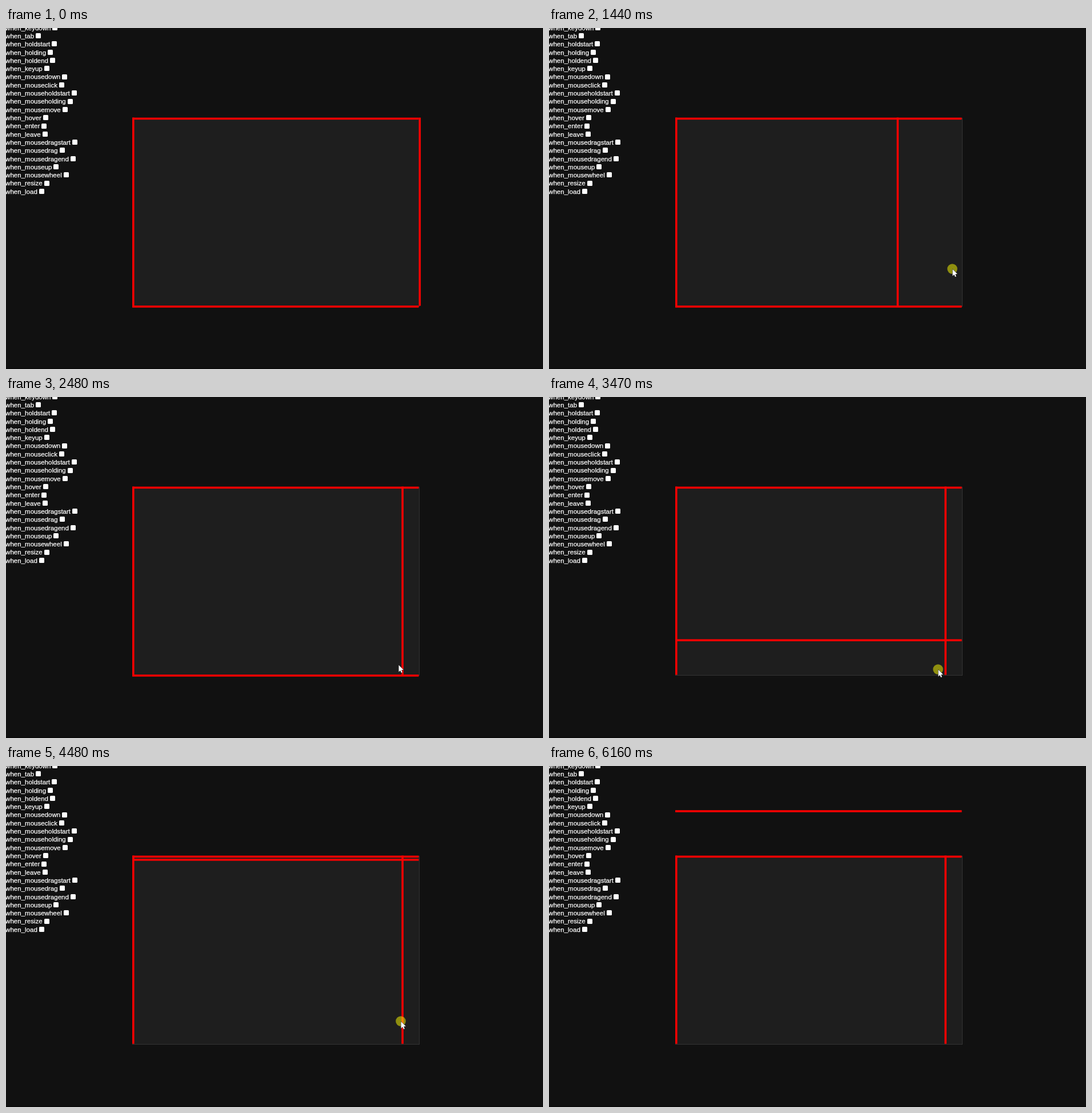
An HTML page with a canvas that plays this animation: 940x596 px, repeating every 6.39 s.

```html
<!DOCTYPE html>
<html lang="en">
<head>
<meta charset="utf-8">
<title>Panel edge dragging</title>
<style>
  html, body { margin: 0; width: 100%; height: 100%; overflow: hidden; background: #111; }
  canvas { display: block; width: 940px; height: 596px; }
</style>
</head>
<body>
<canvas id="stage" width="940" height="596"></canvas>
<script>
const ctx = document.getElementById('stage').getContext('2d', { alpha: false });
const LOOP = 6390;
const LINE = 3.6;
const PANEL = { left: 221, top: 157, right: 724, bottom: 487 };

const EVENTS = ['keydown', 'tab', 'holdstart', 'holding', 'holdend', 'keyup',
  'mousedown', 'mouseclick', 'mouseholdstart', 'mouseholding', 'mousemove',
  'hover', 'enter', 'leave', 'mousedragstart', 'mousedrag', 'mousedragend',
  'mouseup', 'mousewheel', 'resize', 'load'];

const progress = (t, start, end) => Math.min(1, Math.max(0, (t - start) / (end - start)));
const mix = (a, b, u) => a + (b - a) * u;
const easeOut = (u, power) => 1 - (1 - u) ** power;

// Sways through the stops in turn, resting for an instant at each
function swing(u, stops) {
  const phase = u * (stops.length - 1);
  const i = Math.min(Math.floor(phase), stops.length - 2);
  return mix(stops[i], stops[i + 1], (1 - Math.cos((phase - i) * Math.PI)) / 2);
}

// The side edge sways faster and faster
function sideEdge(t) {
  return swing(progress(t, 860, 2100) ** 1.317, [724.3, 905, 263, 884, 694.1]);
}

const lowerDrag = t => progress(t, 3120, 5150);

function lowerEdge(t) {
  const lift = swing(progress(t, 5380, 5500), [0, 86]);
  return swing(lowerDrag(t), [486.9, 408, 690, 7, 165]) - lift;
}

function pointerAt(t) {
  if (t < 860) {
    const u = easeOut(progress(t, 90, 530), 2);
    return [mix(875, 726, u), mix(588, 420, u)];
  }
  if (t < 2260) {
    // The side edge's speed follows how far the pointer has been pulled
    const speed = (sideEdge(t + 1) - sideEdge(t - 1)) / 2;
    const u = progress(t, 860, 2100);
    return [mix(726, 722, u) + 5.4 * speed, mix(420, 427, u ** 3)];
  }
  if (t < 3120) {
    const u = progress(t, 2260, 2890);
    return [mix(722, 682, easeOut(u, 5)), mix(427, 484, easeOut(u, 3))];
  }
  if (t < 5720) {
    const u = lowerDrag(t);
    const nudge = progress(t, 5380, 5690);
    return [swing(u, [682, 681, 682, 694, 697]) + 4 * nudge,
      swing(u, [484, 474, 489, 433, 450]) - nudge];
  }
  const u = progress(t, 5720, 6160) ** 1.6;
  return [mix(701, 875, u), mix(449, 600, u)];
}

function box(color, x, y, w, h) {
  ctx.fillStyle = color;
  ctx.fillRect(x, y, w, h);
}

function drawList() {
  ctx.font = '11.52px "Liberation Sans", Arial, sans-serif';
  ctx.textBaseline = 'alphabetic';
  ctx.fillStyle = ctx.strokeStyle = '#fff';
  ctx.lineWidth = 0.25;
  EVENTS.forEach((name, i) => {
    const label = 'when_' + name;
    const y = 3.6 + i * 14.31;
    ctx.fillText(label, -0.9, y);
    ctx.strokeText(label, -0.9, y);
    const x = Math.round(ctx.measureText(label).width + 2.1);
    ctx.beginPath();
    ctx.roundRect(x, Math.round(y - 8.8), 9, 9, 1.5);
    ctx.fill();
  });
}

function drawPanel(edgeX, edgeY) {
  const { left, top, right, bottom } = PANEL;
  const red = '#f80000';
  const vertical = x => box(red, x - LINE / 2, top - 0.4, LINE, bottom - top - 1);
  const horizontal = y => box(red, left, y - LINE / 2, 501.5, LINE);
  box('#333', left, top, right - left, bottom - top);
  box('#1e1e1e', left + 1, top + 1, right - left - 2, bottom - top - 2);
  horizontal(158.4);
  vertical(left + LINE / 2);
  vertical(edgeX);
  horizontal(edgeY);
}

function drawPointer(x, y, pressed) {
  if (pressed) {
    ctx.fillStyle = 'rgba(255,255,0,0.5)';
    ctx.beginPath();
    ctx.arc(x, y, 8.8, 0, Math.PI * 2);
    ctx.fill();
  }
  ctx.save();
  ctx.translate(x + 0.5, y + 0.5);
  ctx.beginPath();
  [[0, 0], [0, 12], [2.7, 9.5], [4.5, 13.6], [6.4, 12.8], [4.7, 8.8], [8.4, 8.6]]
    .forEach(p => ctx.lineTo(...p));
  ctx.closePath();
  ctx.strokeStyle = '#111';
  ctx.lineWidth = 1;
  ctx.stroke();
  ctx.fillStyle = '#fff';
  ctx.fill();
  ctx.restore();
}

function draw(t) {
  box('#111', 0, 0, 940, 596);
  box('#0b0b0b', 0, 594, 940, 2);
  drawList();
  drawPanel(sideEdge(t), lowerEdge(t));
  if (t >= 90 && t < 6150) {
    const [x, y] = pointerAt(t).map(Math.round);
    const pressed = (t >= 500 && t < 2260) || (t >= 2860 && t < 5600);
    drawPointer(x, y, pressed);
  }
}

const begin = performance.now();
function frame() {
  draw((performance.now() - begin) % LOOP);
  requestAnimationFrame(frame);
}
frame();
</script>
</body>
</html>
```
